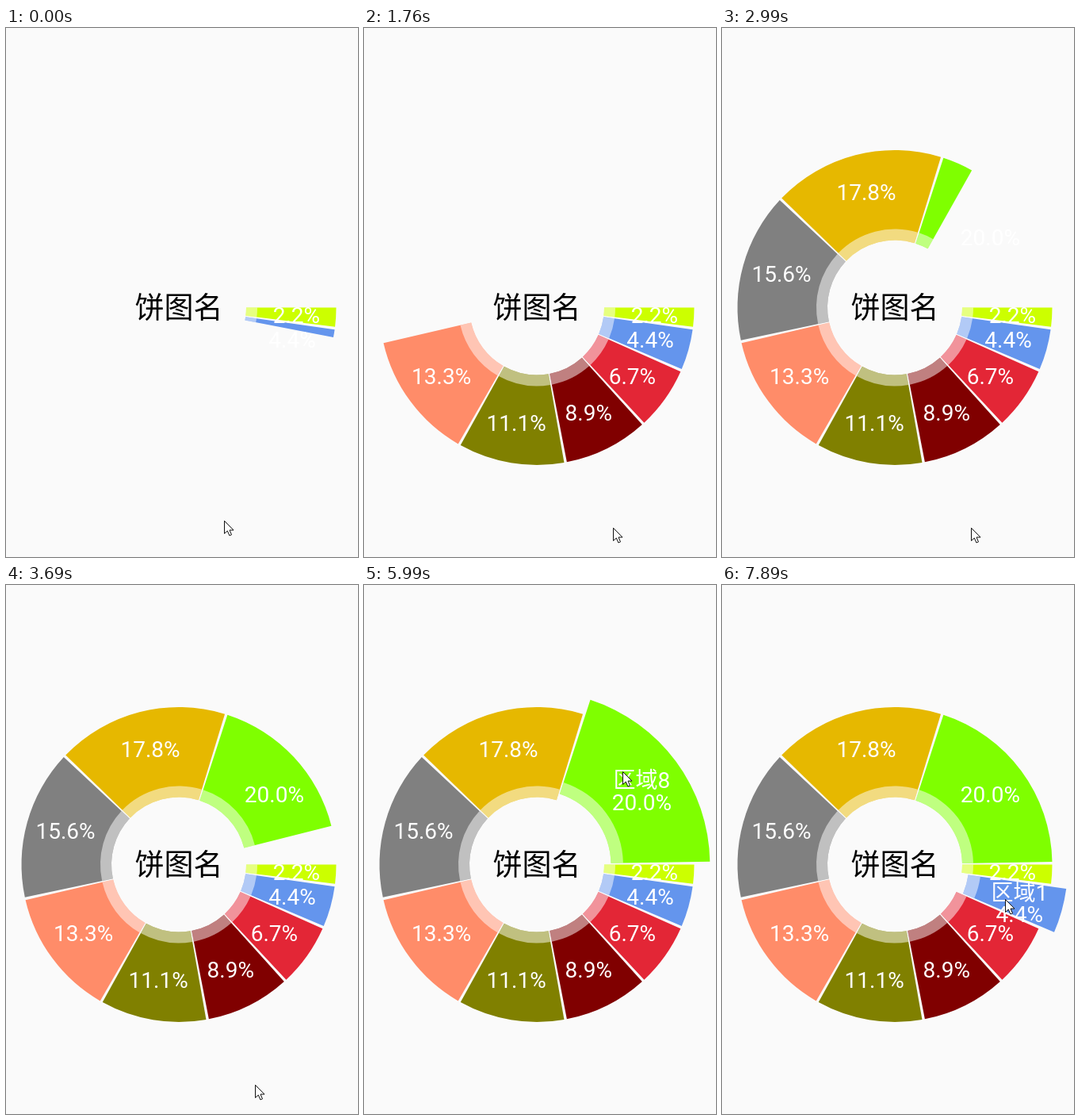
Recreate the animation shown at these times as an HTML page with a canvas. Size 444 by 667 pixels, loop 8 s.

```html
<!DOCTYPE html>
<html lang="zh-CN">
<head>
<meta charset="utf-8">
<style>
html, body { margin: 0; width: 100%; height: 100%; overflow: hidden; background: #fafafa; }
canvas { display: block; width: 444px; height: 667px; }
</style>
</head>
<body>
<canvas id="stage" width="444" height="667"></canvas>
<script>
const ctx = document.getElementById('stage').getContext('2d');
const LOOP = 8000, STEP = 135.3;
const CX = 218, CY = 352.5, OUTER = 198.5, RING = 99, HOLE = 85;
const FONT = 'Roboto, "Noto Sans CJK SC", "Noto Sans CJK", sans-serif';
const CJK = '"Noto Sans CJK SC", "Noto Sans CJK", sans-serif';
const colors = ['#ccff00', '#6495ed', '#e32636', '#800000', '#808000',
                '#ff8c69', '#808080', '#e6b800', '#7fff00'];

// Slice i has the value i + 1; all nine add up to 45.
let from = 0;
const slices = colors.map((color, i) => {
  const size = (i + 1) * 8;
  const slice = { color, from, size, name: '区域' + i, label: ((i + 1) / 45 * 100).toFixed(1) + '%' };
  from += size;
  return slice;
});

// [step, progress] of the opening sweep
const sweep = [[0, .1114], [6, .273], [13, .477], [18, .617], [27, .8726], [32, 1]];
// [ms, selected slice]
const picks = [[0, -1], [5170, 7], [5990, 8], [7040, 0], [7890, 1]];
// [ms, x, y] of the pointer tip
const moves = [
  [0, 275, 621], [150, 284, 625], [290, 300, 632], [430, 314, 630],
  [4500, 197, 530], [4630, 215, 330], [4760, 165, 290], [4890, 162, 219],
  [5450, 200, 232], [5590, 270, 234], [5720, 326, 235],
  [6450, 334, 268], [6590, 346, 322], [6730, 354, 362],
  [7500, 356, 376], [7630, 357, 390], [7760, 357, 396]
];

const rad = deg => deg * Math.PI / 180;
const latest = (table, t) => table.filter(row => row[0] <= t).pop();

function sweepAngle(t) {
  const n = Math.floor(t / STEP);
  const k = sweep.findIndex(row => row[0] > n);
  if (k < 0) return 360;
  const [a, pa] = sweep[k - 1], [b, pb] = sweep[k];
  const p = pa + (pb - pa) * (n - a) / (b - a);
  return 180 * (1 - Math.cos(Math.PI * p));
}

function band(r0, r1, a, b, fill) {
  ctx.beginPath();
  ctx.arc(CX, CY, r1, rad(a), rad(b));
  ctx.arc(CX, CY, r0, rad(b), rad(a), true);
  ctx.closePath();
  ctx.fillStyle = fill;
  ctx.fill();
}

function write(text, x, y, size, fill, family) {
  ctx.font = size + 'px ' + family;
  ctx.fillStyle = fill;
  ctx.fillText(text, x, y);
}

function drawSlice(s, angle, scale) {
  const end = Math.min(angle, s.from + s.size - 1);
  if (end <= s.from) return;
  band(HOLE * scale, OUTER * scale, s.from, end, s.color);
  band(HOLE * scale, RING * scale, s.from, end, 'rgba(255,255,255,.5)');
}

function drawLabel(s, scale) {
  const mid = rad(s.from + s.size / 2);
  const r = (OUTER + RING) / 2 * scale;
  const x = CX + r * Math.cos(mid), y = CY + r * Math.sin(mid);
  if (scale > 1) {
    write(s.name, x, y, 28, '#fff', FONT);
    write(s.label, x, y + 27.5, 28, '#fff', FONT);
  } else {
    write(s.label, x, y + 9, 28, '#fff', FONT);
  }
}

function drawPointer(x, y) {
  const shape = new Path2D('M0 0V16L3.8 12.6L6.4 18.5L9 17.4L6.5 11.6H11.5Z');
  ctx.save();
  ctx.translate(x + .5, y + .5);
  ctx.fillStyle = '#fff';
  ctx.fill(shape);
  ctx.strokeStyle = '#111';
  ctx.lineWidth = 1;
  ctx.stroke(shape);
  ctx.restore();
}

function draw(t) {
  const angle = sweepAngle(t);
  const picked = latest(picks, t)[1];
  const scale = i => i === picked ? 1.1 : 1;
  ctx.fillStyle = '#fafafa';
  ctx.fillRect(0, 0, 444, 667);
  ctx.textAlign = 'center';
  slices.forEach((s, i) => drawSlice(s, angle, scale(i)));
  slices.forEach((s, i) => { if (angle > s.from) drawLabel(s, scale(i)); });
  write('饼图名', CX, 366, 37, '#000', CJK);
  const [, x, y] = latest(moves, t);
  drawPointer(x, y);
}

const start = performance.now();
function tick() {
  draw((performance.now() - start) % LOOP);
  requestAnimationFrame(tick);
}
tick();
</script>
</body>
</html>
```
